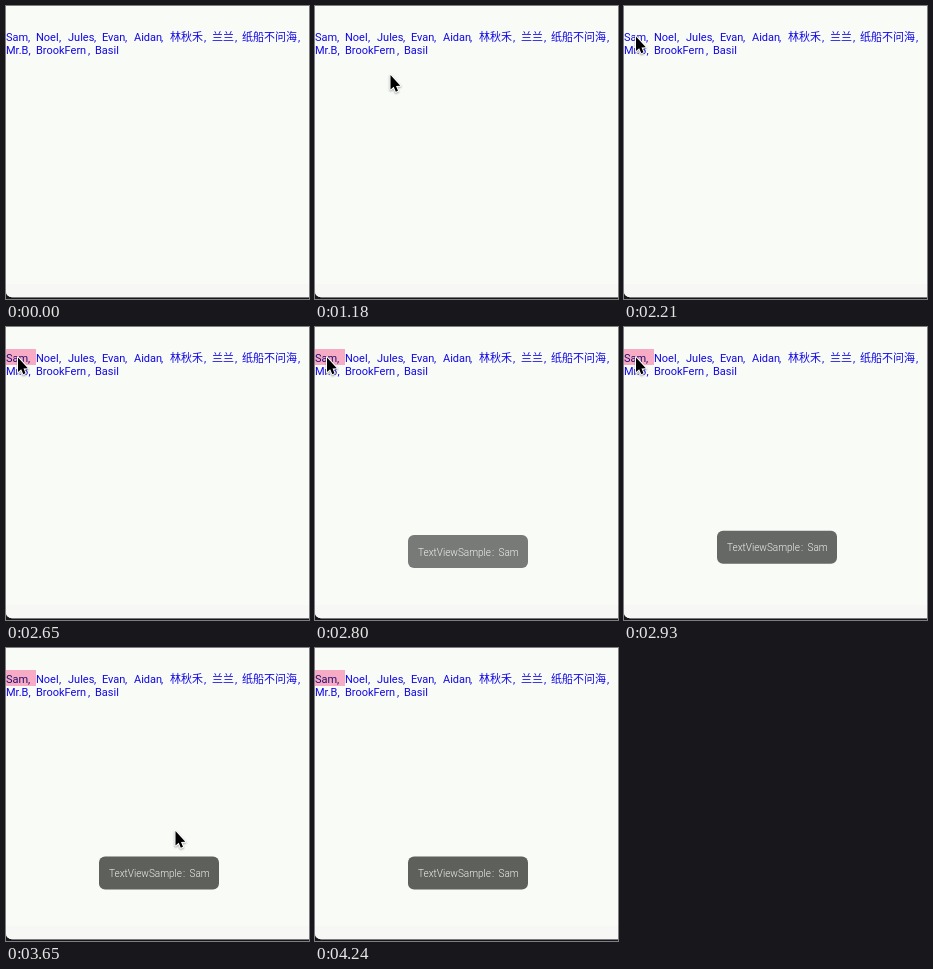
Animation of 303x293 px, one loop 4680 ms. Source, as an HTML page with a canvas:

```html
<!DOCTYPE html>
<html lang="en">
<head>
<meta charset="utf-8">
<title>Clickable names</title>
<style>
  html, body { margin: 0; width: 100%; height: 100%; overflow: hidden; background: #f8fbf6; }
  canvas { display: block; width: 303px; height: 293px; }
</style>
</head>
<body>
<canvas id="stage" width="303" height="293"></canvas>
<script>
const ctx = document.getElementById('stage').getContext('2d');
const LOOP = 4680;
const PRESSED_AT = 2650;
const PAPER = '#f8fbf6';

// [text, x, comma x]
const lines = [
  { baseline: 35, names: [
    ['Sam', 0, 22], ['Noel', 30, 53], ['Jules', 62, 88], ['Evan', 96, 119],
    ['Aidan', 128, 155], ['林秋禾', 164, 198], ['兰兰', 206, 229], ['纸船不问海', 236, 292]
  ] },
  { baseline: 48, names: [['Mr.B', 0, 22.5], ['BrookFern', 30, 82], ['Basil', 89]] }
];

// [start time, x, y]; a step without a position hides the pointer
const pointerSteps = [
  [1180, 74, 70], [1330, 72, 77], [1480, 55, 71], [1620, 30, 60],
  [1770, 20, 42], [1920, 11, 34], [2060, 9, 33], [2210, 10.5, 31.5],
  [3500, 47, 75], [3650, 168, 184], [3800, 231, 248], [3950, 262, 283],
  [4100, 270, 288], [4240]
];

// [start time, top, colour]
const toastSteps = [
  [2800, 208, '#777a76'], [2930, 203.7, '#656864'],
  [3060, 208, '#5f625d'], [3210, 208.5, '#5d605b']
];

const arrow = [[1.5, -1], [1.5, 13.5], [4.7, 10.7], [6.8, 15.8], [9, 14.8], [7, 10], [11.3, 9.7]];

const stepAt = (steps, t) => steps.filter(step => step[0] <= t).pop();

function roundBox(x, y, w, h, r) {
  ctx.beginPath();
  ctx.roundRect(x, y, w, h, r);
  ctx.fill();
}

function drawScreen() {
  ctx.fillStyle = '#15171a';
  ctx.fillRect(0, 280, 303, 13);
  ctx.fillStyle = PAPER;
  ctx.fillRect(0, 0, 303, 282);
  roundBox(0, 270, 320, 21.3, [0, 0, 0, 6]);
  ctx.fillStyle = '#f7f8f6';
  roundBox(0, 278, 320, 13.3, [0, 0, 0, 6]);
}

function drawNames(pressed) {
  if (pressed) {
    ctx.fillStyle = '#f8abc4';
    ctx.fillRect(0, 22, 30, 16);
  }
  ctx.font = '11px Roboto, "Noto Sans CJK SC", "Noto Sans CJK", sans-serif';
  lines.forEach(({ baseline, names }, row) => {
    names.forEach(([name, x, commaX], i) => {
      ctx.fillStyle = pressed && row === 0 && i === 0 ? '#241070' : '#1208e8';
      ctx.fillText(name, x, baseline);
      if (commaX) ctx.fillText(',', commaX, baseline);
    });
  });
}

function drawToast([, top, colour]) {
  ctx.fillStyle = colour;
  roundBox(93, top, 120, 33, 6);
  ctx.fillStyle = '#eff0ee';
  ctx.font = '300 10px Roboto, sans-serif';
  ctx.fillText('TextViewSample', 103, top + 20.5);
  ctx.fillText(':', 177, top + 20.5);
  ctx.fillText('Sam', 183.5, top + 20.5);
}

function drawPointer([, x, y]) {
  ctx.save();
  ctx.translate(x, y);
  ctx.beginPath();
  arrow.forEach(point => ctx.lineTo(...point));
  ctx.closePath();
  ctx.lineJoin = 'round';
  ctx.lineWidth = 2;
  ctx.strokeStyle = '#fff';
  ctx.shadowColor = 'rgba(0, 0, 0, 0.35)';
  ctx.shadowBlur = 2;
  ctx.shadowOffsetY = 1;
  ctx.stroke();
  ctx.shadowColor = 'transparent';
  ctx.fillStyle = '#000';
  ctx.fill();
  ctx.restore();
}

function render(now) {
  const t = now % LOOP;
  const toast = stepAt(toastSteps, t);
  const pointer = stepAt(pointerSteps, t);
  drawScreen();
  drawNames(t >= PRESSED_AT);
  if (toast) drawToast(toast);
  if (pointer && pointer.length > 1) drawPointer(pointer);
}

const start = performance.now();
function tick() {
  render(performance.now() - start);
  requestAnimationFrame(tick);
}
tick();
</script>
</body>
</html>
```
